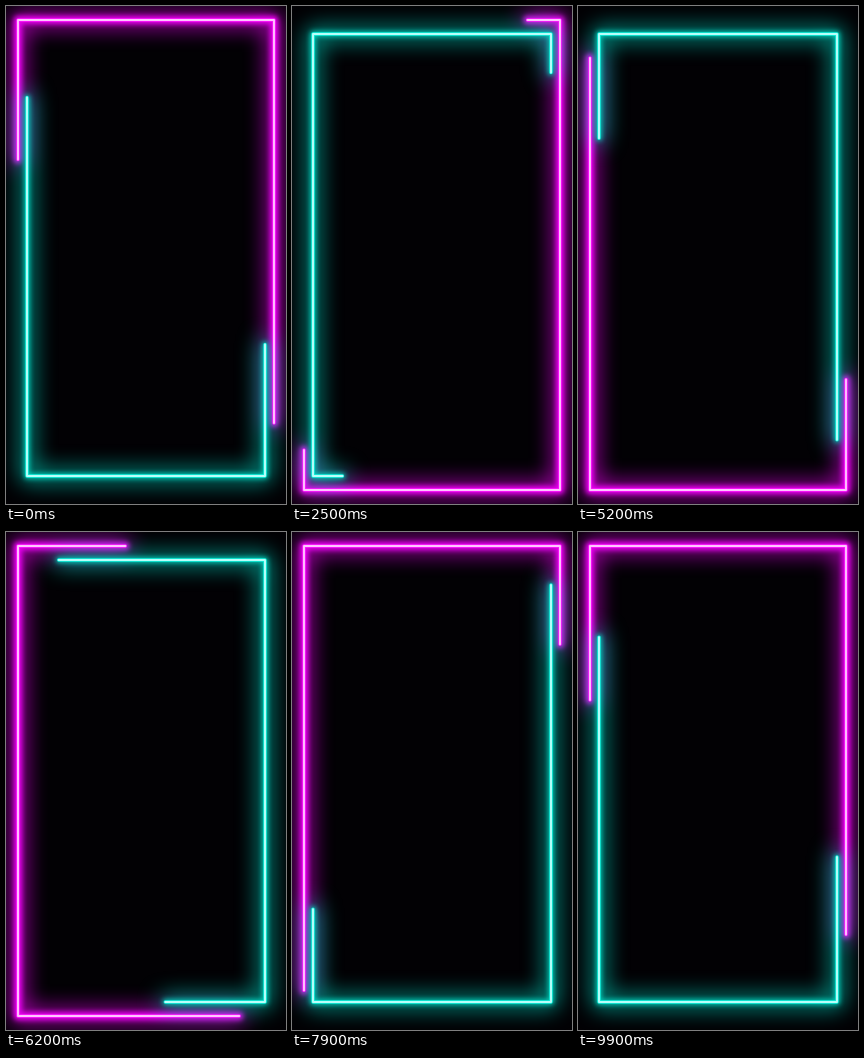
Recreate the animation shown at these times as an HTML page. Size 280x498 px, loop 10000 ms.

```html
<!DOCTYPE html>
<html lang="en">
<head>
<meta charset="utf-8">
<title>Neon frame</title>
<style>
  html, body { margin: 0; width: 100%; height: 100%; overflow: hidden; background: #020104; }
  svg { display: block; width: 100%; height: 100%; }
  path { fill: none; stroke-linecap: round; stroke-linejoin: round; }
  .halo { filter: blur(11px); }
  .glow { filter: blur(2.8px); }
  .edge { filter: blur(0.6px); }
  .core { filter: blur(0.4px); }
</style>
</head>
<body>
<svg id="stage" viewBox="0 0 280 498"></svg>
<script>
const LOOP = 10000;
const STEP = 100;
const LIT = 0.55; // lit share of each outline

const tubes = [
  { x: 12, y: 14, w: 256, h: 470, start: -139.5, halo: 11, glow: 8.5, tint: '#e600ee', edge: '#ff1cff', core: '#ffc4ff' },
  { x: 21, y: 28, w: 238, h: 442, start: 548.5, halo: 10, glow: 5.5, tint: '#00d2be', edge: '#14f4e0', core: '#b8fffa' }
];

const stage = document.getElementById('stage');

function addPath(tube, cls, width, color) {
  const path = document.createElementNS('http://www.w3.org/2000/svg', 'path');
  const lap = `H${tube.x + tube.w}V${tube.y + tube.h}H${tube.x}V${tube.y}`;
  // Two laps keep the lit part continuous across the starting corner.
  path.setAttribute('d', `M${tube.x} ${tube.y}${lap}${lap}`);
  path.setAttribute('class', cls);
  path.setAttribute('stroke', color);
  path.setAttribute('stroke-width', width);
  path.setAttribute('stroke-dasharray', `${tube.perimeter * LIT} ${tube.perimeter * 3}`);
  stage.append(path);
  tube.paths.push(path);
}

for (const tube of tubes) {
  tube.perimeter = 2 * (tube.w + tube.h);
  tube.paths = [];
  addPath(tube, 'halo', tube.halo, tube.tint);
  addPath(tube, 'glow', tube.glow, tube.tint);
}
// Bright lines lie above both glows.
for (const tube of tubes) {
  addPath(tube, 'edge', 3.4, tube.edge);
  addPath(tube, 'core', 1.9, tube.core);
}

function render(ms) {
  const progress = Math.floor((ms % LOOP) / STEP) * STEP / LOOP;
  for (const { perimeter, start, paths } of tubes) {
    const head = (start + perimeter * (1 + progress)) % perimeter;
    for (const path of paths) path.setAttribute('stroke-dashoffset', -head);
  }
}

const begin = performance.now();
function tick() {
  render(performance.now() - begin);
  requestAnimationFrame(tick);
}
tick();
</script>
</body>
</html>
```
